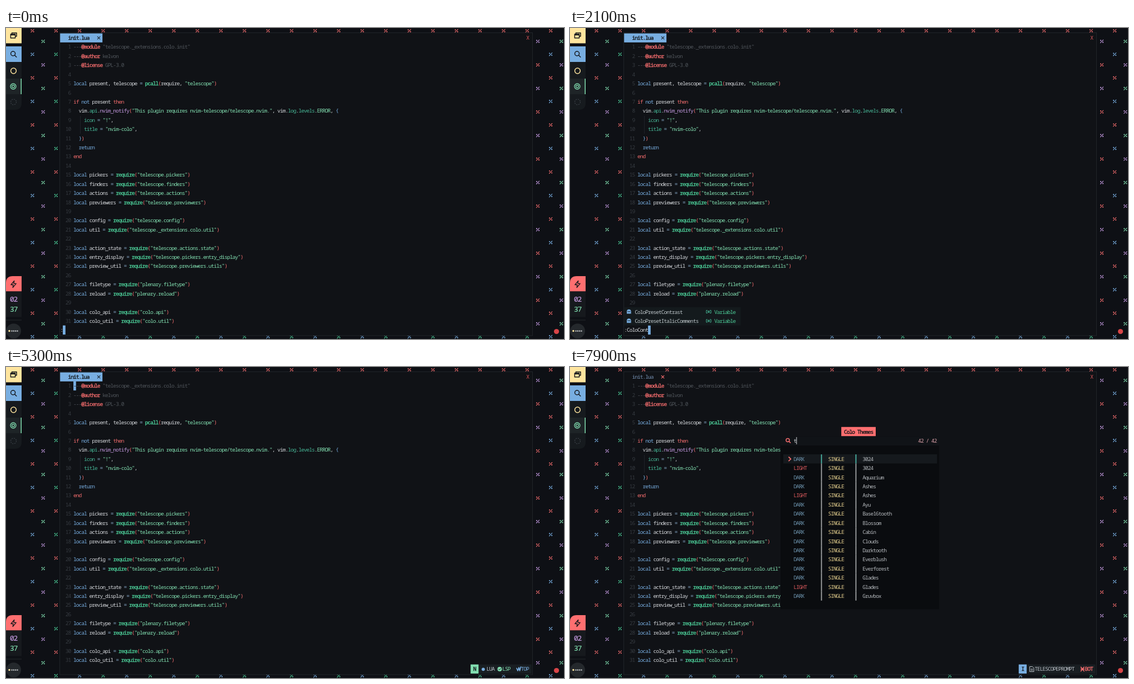
These frames come from a looping animation (1002 by 559 pixels, 8000 ms). An HTML page:

```html
<!DOCTYPE html>
<html lang="en">
<head>
<meta charset="utf-8">
<title>Editor session</title>
<style>
html, body { margin: 0; width: 100%; height: 100%; overflow: hidden; background: #0e1015; }
svg { display: block; width: 1002px; height: 559px; }
text { font: 9.6px "Noto Sans Mono", "DejaVu Sans Mono", monospace; font-stretch: extra-condensed; fill: currentColor;
  letter-spacing: var(--gap, -1px); white-space: pre; font-variant-ligatures: none; }
tspan { fill: currentColor; }
.b { stroke: currentColor; stroke-width: .35px; }
.clock { font-size: 13px; letter-spacing: -1.2px; stroke: currentColor; stroke-width: .2px; }
</style>
</head>
<body>
<svg id="stage" viewBox="0 0 1002 559" xmlns="http://www.w3.org/2000/svg"></svg>
<script>
const CW = 4.755, LH = 16.417, LOOP = 8000;
const C = { bg: '#101216', fg: '#d3d6da', blue: '#78aee1', green: '#4ccb97', str: '#82dfb1', red: '#f16c6d',
  purple: '#c49ae0', yellow: '#ffe59e', teal: '#46b595', dim: '#50555b', num: '#363b41', ink: '#101317', bar: '#191e22' };
const stage = document.getElementById('stage');
const colX = c => 97.25 + c * CW;
const rowY = r => 17.5 + r * LH;

// Shapes
const rect = (x, y, w, h, fill, more = '') => `<rect x="${x}" y="${y}" width="${w}" height="${h}" fill="${fill}" ${more}/>`;
const disc = (x, y, r, fill, more = '') => `<circle cx="${x}" cy="${y}" r="${r}" fill="${fill}" ${more}/>`;
const ring = (x, y, r, color, w, more = '') => disc(x, y, r, 'none', `stroke="${color}" stroke-width="${w}" ${more}`);
const path = (d, color, w = 1.4) => `<path d="${d}" fill="none" stroke="${color}" stroke-width="${w}" stroke-linecap="round" stroke-linejoin="round"/>`;
const cells = (row, col, n, fill, rows = 1) => rect(colX(col), rowY(row) - LH / 2, n * CW, rows * LH, fill);
const group = (id, body) => `<g id="${id}">${body}</g>`;
const lens = (x, y, r, color, w) => ring(x, y, r, color, w) + path(`M${x + r * .75} ${y + r * .75}l${r * .8} ${r * .8}`, color, w);

// Text on the character grid; a part is [string, colour, bold]
const line = (row, col, ...parts) => `<text x="${colX(col)}" y="${rowY(row) + 3.5}">` +
  parts.map(([s, color, bold]) => `<tspan color="${color}"${bold ? ' class="b"' : ''}>${s}</tspan>`).join('') + '</text>';
const put = (row, col, s, color, bold) => line(row, col, [s, color, bold]);

// Code
const req = (name, mod) => `local ${name} = require("${mod}")`;
const code = [
  '---@module "telescope._extensions.colo.init"', '---@author kelvon', '---@license GPL-3.0', '',
  'local present, telescope = pcall(require, "telescope")', '',
  'if not present then',
  '  vim.api.nvim_notify("This plugin requires nvim-telescope/telescope.nvim.", vim.log.levels.ERROR, {',
  '    icon = "!",', '    title = "nvim-colo",', '  })', '  return', 'end', '',
  req('pickers', 'telescope.pickers'), req('finders', 'telescope.finders'),
  req('actions', 'telescope.actions'), req('previewers', 'telescope.previewers'), '',
  req('config', 'telescope.config'), req('util', 'telescope._extensions.colo.util'), '',
  req('action_state', 'telescope.actions.state'), req('entry_display', 'telescope.pickers.entry_display'),
  req('preview_util', 'telescope.previewers.utils'), '',
  req('filetype', 'plenary.filetype'), req('reload', 'plenary.reload'), '',
  req('colo_api', 'colo.api'), req('colo_util', 'colo.util')
];
const tokens = s => s.match(/^---|@\w+|"[^"]*"?|\w+|\s+|./g) || [];

function editorStyle(tok, next, comment) {
  if (comment) return tok[0] === '@' ? [C.red, 1] : [C.dim];
  if (tok[0] === '"') return [C.str];
  if (/^(local|return|\{|\}|not)$/.test(tok)) return [C.blue];
  if (/^(if|then|end|\(|\))$/.test(tok)) return [C.red];
  if (/^(require|pcall)$/.test(tok) && next === '(') return [C.green, 1];
  if (tok === 'nvim_notify') return [C.purple];
  if (tok === 'ERROR') return [C.str];
  if (/^(api|log|levels|icon|title)$/.test(tok)) return [C.teal];
  return [tok === '=' ? '#8fb4d6' : C.fg];
}
function previewStyle(tok, next, comment) {
  if (comment) return ['#1f807c'];
  if (tok[0] === '"') return ['#ef6a6c'];
  return [/^(local|if|not|then|return|end)$/.test(tok) ? '#d9b54a' : C.fg];
}
function source(s, row, col, style) {
  const t = tokens(s), comment = s.startsWith('---');
  return s && line(row, col, ...t.map((tok, i) => [tok, ...style(tok, t[i + 1], comment)]));
}

// Desktop pattern and side bar
function desktop() {
  const mark = (x, y, c) => path(`M${x + 2.6} ${y - 2.7}L${x - 2.6} ${y + 2.7}`, c, 1.1) +
    disc(x - 2, y - 1.7, 1.1, c) + disc(x + 2, y + 1.7, 1.1, c);
  const step = 42.3;
  let s = rect(0, 0, 1002, 559, '#0e1015');
  for (let i = 0; i < 23; i++) for (let j = 0; j < 14; j++) {
    const odd = i % 2, a = j % 2 ? (odd ? C.green : C.blue) : C.red;
    const b = odd === j % 2 ? (odd ? C.red : C.str) : C.purple;
    s += mark(47.5 + i * step, 5 + j * step, a) + mark(66.7 + i * step, 24 + j * step, b);
  }
  return s;
}
function sideBar() {
  const k = '#15181c';
  return rect(0, 0, 28, 27.5, C.yellow) +
    path('M10.5 10.5V8.7H19V15H17.6M8.4 11H16.6V18H8.4ZM8.4 12.4H16.6', k, 1.5) +
    rect(0, 33, 28, 28, C.blue) + lens(12.6, 46, 4, k, 1.5) +
    `<path d="M0 61H28V135Q28 147 16 147H0Z" fill="#161a1e"/>` +
    rect(0, 91, 28, 28, '#1e2427') + rect(26.5, 91, 1.5, 28, C.str) +
    ring(13.5, 77, 4.9, C.yellow, 1.5) + ring(13, 105, 5, C.str, 1.3) + ring(13, 105, 2.4, C.str, 1.3) +
    ring(13.5, 133, 5, '#3b4248', 1.2, 'stroke-dasharray="2.2 1.7"') +
    `<path d="M0 473.5V458Q0 446 12 446H28V473.5Z" fill="#ff6f70"/>` +
    path('M14.8 454.5L8.9 461.5H13L12.2 466.5L18.2 459.3H14Z', k, 1.3) +
    rect(0, 473.5, 28, 46, '#16191d') +
    `<text class="clock" x="7" y="492.3" color="${C.purple}">02</text><text class="clock" x="7" y="510.3" color="${C.str}">37</text>` +
    rect(0, 524.5, 28, 1, '#24282d') + disc(13.7, 544.5, 13.3, '#24282c') +
    disc(6, 544.5, 1.7, C.yellow) + [9.5, 12.8, 16.1, 19.4].map(x => rect(x, 543.5, 2.2, 2.2, '#c4c7ca')).join('') +
    disc(988.5, 545.5, 4.6, '#d84548');
}

// Editor window
const cross = color => path('M164.3 15.5l4.6 4.6m0-4.6l-4.6 4.6', color, 1.1);
const win = () => rect(96.5, 8.5, 849, 544.5, C.bg, 'stroke="#202429"') +
  group('tabOn', rect(97.2, 9.7, 76, 16.2, C.blue) + put(0, 3, 'init.lua', C.ink, 1) + cross('#22303d')) +
  group('tabOff', put(0, 3, 'init.lua', '#7793b5') + cross(C.red)) +
  put(0, 176, 'X', '#e0585b') +
  group('code', rect(133, 158, .8, 32, '#24292d') + code.map((s, i) =>
    put(i + 1, i < 9 ? 3 : 2, i + 1, C.num) + source(s, i + 1, 5, editorStyle)).join(''));

const normal = () => cells(1, 5, 1, C.blue) + put(1, 5, '-', C.ink) +
  cells(32, 158, 20, C.bar) + cells(32, 155, 3, C.str) + put(32, 156, 'N', C.ink, 1) +
  disc(857, 543.3, 2.9, C.blue) + put(32, 161, 'LUA', '#b9bfc6') +
  disc(886.5, 543, 4, C.str) + path('M884.6 543l1.5 1.5l2.5-2.8', C.ink, 1) + put(32, 167, 'LSP', C.str) +
  path('M917 541.5l2 4.5l2-6l1.5 6l2-7', C.blue, 1.7) + put(32, 174, 'TOP', C.blue);

const prompt = s => put(32, 0, s, C.fg) + cells(32, s.length, 1, C.blue);

// Completion menu
const vars = ('Colo ColoAdd ColoNext ColoTele ColoClean ColoInvert ColoRandom ColoRemove ColoToggle ColoPrevious ' +
  'ColorizerToggle ColoLoadExtension ColoPresetContrast ColoPresetDottedSpell ColoPresetItalicComments ' +
  'ColorizerAttachToBuffers ColorizerReloadAllBuffers ColorizerDetachFromBuffers').split(' ');
const words = ['colo', 'colo_api', 'colo_util', 'nvim-colo'];
const ghost = y => `<path d="M102 ${y + 4}V${y - .5}a3.8 3.8 0 0 1 7.6 0V${y + 4}l-1.3-1l-1.2 1l-1.3-1l-1.3 1l-1.2-1Z" fill="${C.blue}"/>` +
  disc(104.4, y - .3, .9, C.ink) + disc(107.2, y - .3, .9, C.ink);
function menu(query) {
  const fuzzy = new RegExp([...query].join('.*'), 'i');
  const list = [...vars, ...words].filter(s => fuzzy.test(s));
  const top = 32 - list.length;
  return cells(top, 0, 44, '#141a1d', list.length) + list.map((s, i) => {
    const r = top + i, y = rowY(r), isVar = vars.includes(s);
    return put(r, 4, s, '#bcc4c8') + (isVar
      ? ghost(y) + path(`M246.4 ${y - 2.5}h-1.5v5h1.5M251.6 ${y - 2.5}h1.5v5h-1.5`, C.teal, 1) + ring(249, y, 1.4, C.teal, 1.2) +
        put(r, 34, 'Variable', C.green)
      : rect(102.7, y - 3, 6, 6, C.blue) +
        `<text x="244.5" y="${y + 2.3}" color="${C.blue}" class="b" style="font-size:6.5px;letter-spacing:-.8px">abc</text>` +
        put(r, 34, 'Text', C.blue));
  }).join('');
}

// File manager
const manager = () => put(3, 18, 'tiler@yard', C.str, 1) +
  line(3, 29, ['/home/tiler/Dotfiles/nvim-colo/lua/telescope/_extensions/colo/', C.blue, 1], ['init.lua', C.fg, 1]) +
  cells(4, 18, 16, '#70aee8') + `<path d="M187.5 80h3.5l1 1.2h4v5.6h-8.5Z" fill="${C.ink}"/>` +
  put(4, 21, 'colo', C.ink, 1) + put(4, 33, '+', C.ink, 1) + cells(4, 35, 52, '#bcbec0') +
  [['init.lua', '1.85 K', C.ink], ['util.lua', '2.24 K', C.fg]].map(([name, size, c], i) =>
    put(4 + i, 36, i, c, !i) + disc(286.2, rowY(4 + i), 3.2, c) + put(4 + i, 41, name, c, !i) + put(4 + i, 79, size, c, !i)).join('') +
  put(4, 86, '+', C.ink, 1) + path('M508.7 100.5l1.8 2l3.5-5', C.str, 1.1) +
  code.slice(0, 24).map((s, i) => source(s.slice(0, 72), 4 + i, 88, previewStyle)).join('') +
  line(28, 18, ['-rw-r--r-- ', '#64c4c0'], ['1 tiler tiler 1.85K 2022-12-30 02:27 ', C.fg], ['(git: main) ', C.blue],
    ['=+ ', C.str], ['2022-12-29 09:21 ', '#68b5c8'], ['feat: added houseki theme', C.yellow]) +
  put(28, 130, '4.09K sum, 816G free  1/2  All', C.fg);

// Theme picker; a leading * marks a light theme
const themes = '3024 *3024 Aquarium Ashes *Ashes Ayu Base16tooth Blossom Cabin Clouds Darktooth Everblush Everforest Glades *Glades Gruvbox'.split(' ');
const picker = s => rect(378, 124.5, 285, 311, '#0a0c0f') + rect(378, 124.5, 285, 16.5, '#101317') +
  cells(6, 82, 13, '#ff6f70') + put(6, 83, 'Colo Themes', C.ink, 1) +
  lens(391, 131.5, 3, C.red, 1.5) + put(7, 64, s, C.fg) + rect(colX(64 + s.length), 126, 1, 13, C.fg) +
  put(7, 111, '42 / 42', '#dba0a8') + rect(383, 157, 276, 16.4, '#15191d') +
  path('M393 162l3.5 3.3l-3.5 3.3', C.red, 1.8) +
  themes.map((name, i) => {
    const r = 9 + i, light = name[0] === '*', bar = i ? '#a9abad' : '#4fbfae', y = rowY(r) - LH / 2;
    return put(r, 64, light ? 'LIGHT' : 'DARK', light ? '#e05c5f' : '#6d93ad') + put(r, 77, 'SINGLE', '#e6d08f') +
      put(r, 90, name.replace('*', ''), '#b4b8bc') + rect(450.7, y, 1.7, LH + .1, bar) + rect(512.6, y, 1.7, LH + .1, bar);
  }).join('') +
  cells(32, 152, 26, C.bar) + cells(32, 149, 3, C.blue) + put(32, 150, 'I', C.ink, 1) +
  path('M825.8 538.5h4.5l2.7 2.7v6.3h-7.2ZM827.5 543h3.6m-3.6 2.2h3.6', '#b9bfc6', 1) +
  put(32, 155, 'TELESCOPEPROMPT', '#b9bfc6') + path('M917.5 539.5l5.5 7m0-7l-5.5 7M917.5 543h6', C.red, 1.7) +
  put(32, 174, 'BOT', C.red, 1);

// [start ms, mode, typed text, completion query]
const steps = [
  [0, 'cmd', ':'], [100, 'cmd', ':C'], [300, 'cmd', ':Co'], [400, 'cmd', ':Co', 'Co'], [500, 'cmd', ':Col', 'Col'],
  [800, 'cmd', ':Colo', 'Colo'], [1500, 'cmd', ':ColoC', 'Colo'], [1600, 'cmd', ':ColoCo', 'ColoC'],
  [1700, 'cmd', ':ColoCo', 'ColoCo'], [1800, 'cmd', ':ColoCon', 'ColoCo'], [1900, 'cmd', ':ColoCon', 'ColoCon'],
  [2100, 'cmd', ':ColoCont', 'ColoCon'], [2200, 'cmd', ':ColoCont', 'ColoCont'], [2800, 'normal'],
  [3800, 'float', ''], [3900, 'float', 'files'], [5200, 'normal'], [6100, 'cmd', ':'], [7100, 'normal'],
  [7600, 'pick', ''], [7900, 'pick', 't']
];
const views = {
  normal,
  cmd: (s, query) => prompt(s) + (query ? menu(query) : ''),
  float: s => cells(3, 18, 142, '#0e1416', 26) + (s && manager()),
  pick: picker
};

stage.innerHTML = desktop() + sideBar() + win() + '<g id="view"></g><text id="probe" style="letter-spacing:0" opacity="0"></text>';
const $ = id => document.getElementById(id);
$('probe').textContent = 'm'.repeat(100);
stage.style.setProperty('--gap', CW - $('probe').getComputedTextLength() / 100 + 'px');
$('probe').remove();

let shown = -1;
function draw(t) {
  const at = steps.findLastIndex(s => s[0] <= t);
  if (at === shown) return;
  shown = at;
  const [, mode, typed, query] = steps[at], away = mode === 'float' || mode === 'pick';
  $('tabOn').style.display = away ? 'none' : '';
  $('tabOff').style.display = away ? '' : 'none';
  $('code').style.opacity = mode === 'float' ? .72 : 1;
  $('view').innerHTML = views[mode](typed, query);
}
const start = performance.now();
function tick() {
  draw((performance.now() - start) % LOOP);
  requestAnimationFrame(tick);
}
tick();
</script>
</body>
</html>
```
